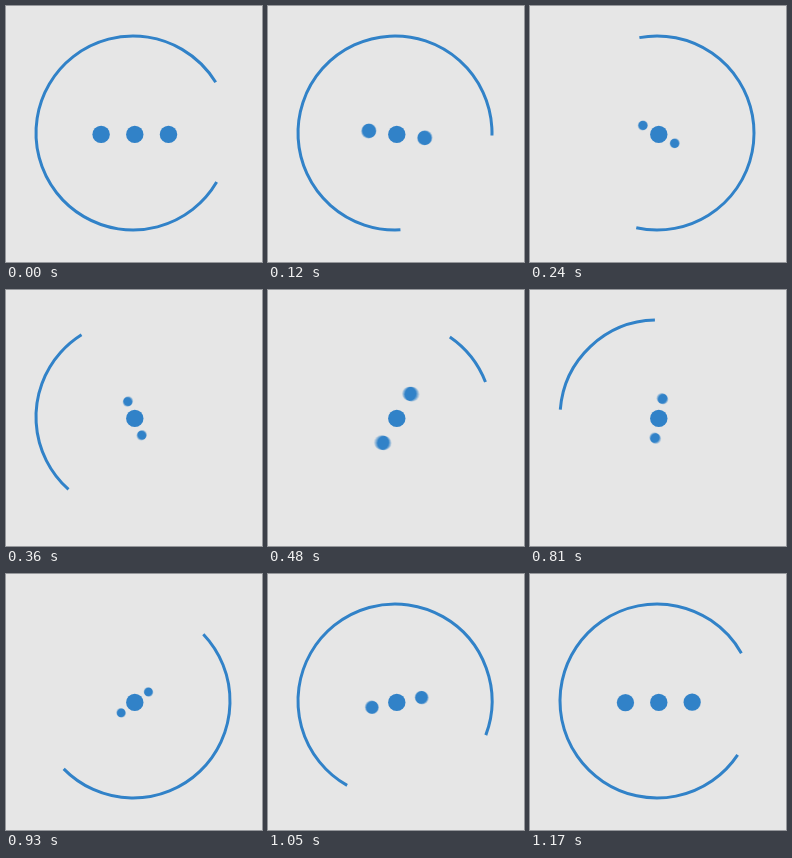
An HTML page with a canvas for the animation above (1.2 s loop, 256x256 px).

```html
<!DOCTYPE html>
<html lang="en">
<head>
<meta charset="utf-8">
<title>Loader</title>
<style>
  html, body { margin: 0; width: 100%; height: 100%; overflow: hidden; background: #e6e6e6; }
  canvas { display: block; width: 256px; height: 256px; }
</style>
</head>
<body>
<canvas id="stage" width="256" height="256"></canvas>
<script>
const SIZE = 256, LOOP = 1200, STEP = 30;
const BLUE = '#3182c8', PAPER = '#e6e6e6';
const RING = { x: 127, y: 127, r: 97, width: 3 };
const DOTS = { x: 128.8, y: 128.4, r: 8.7, gap: 33.7 };
const SHUTTER = 15, SAMPLES = 15;

const ctx = document.getElementById('stage').getContext('2d');
const mask = document.createElement('canvas');
mask.width = mask.height = SIZE;
const maskCtx = mask.getContext('2d');

const rad = deg => deg * Math.PI / 180;
const mix = (a, b, k) => a + (b - a) * k;
const wrap = (v, n) => ((v % n) + n) % n;

// cubic-bezier(.42, 0, .58, 1), solved by bisection
function easeInOut(x) {
  let lo = 0, hi = 1;
  for (let i = 0; i < 30; i++) {
    const s = (lo + hi) / 2, q = 1 - s;
    if (3 * q * q * s * 0.42 + 3 * q * s * s * 0.58 + s * s * s < x) lo = s;
    else hi = s;
  }
  return lo * lo * (3 - 2 * lo);
}

// Eased there-and-back value from 0 to 1 to 0
function swing(t, period) {
  const u = wrap(t, period) / period * 2;
  return easeInOut(u < 1 ? u : 2 - u);
}

function drawRing(t) {
  const k = swing(t, LOOP);
  ctx.strokeStyle = BLUE;
  ctx.lineWidth = RING.width;
  ctx.beginPath();
  ctx.arc(RING.x, RING.y, RING.r, rad(mix(30.4, 720.8, k)), rad(mix(328.5, 731.8, k)));
  ctx.stroke();
}

function dot(c, x, y, r) {
  c.beginPath();
  c.arc(x, y, r, 0, Math.PI * 2);
  c.fill();
}

// The orbiting pair is averaged over the shutter time for motion blur
function drawOrbit(t) {
  maskCtx.globalCompositeOperation = 'source-over';
  maskCtx.globalAlpha = 1;
  maskCtx.clearRect(0, 0, SIZE, SIZE);
  maskCtx.globalCompositeOperation = 'lighter';
  maskCtx.globalAlpha = 1 / SAMPLES;
  maskCtx.fillStyle = '#000';
  for (let i = 0; i < SAMPLES; i++) {
    const time = t + SHUTTER * ((i + 0.5) / SAMPLES - 0.5);
    const angle = rad(360 * easeInOut(wrap(time, LOOP) / LOOP));
    const scale = 1 - 0.5 * swing(time, LOOP / 2);
    const dx = Math.cos(angle) * DOTS.gap * scale;
    const dy = Math.sin(angle) * DOTS.gap * scale;
    dot(maskCtx, DOTS.x - dx, DOTS.y - dy, DOTS.r * scale);
    dot(maskCtx, DOTS.x + dx, DOTS.y + dy, DOTS.r * scale);
  }
  maskCtx.globalCompositeOperation = 'source-in';
  maskCtx.globalAlpha = 1;
  maskCtx.fillStyle = BLUE;
  maskCtx.fillRect(0, 0, SIZE, SIZE);
  ctx.drawImage(mask, 0, 0);
}

function draw(t) {
  ctx.fillStyle = PAPER;
  ctx.fillRect(0, 0, SIZE, SIZE);
  drawRing(t);
  drawOrbit(t);
  ctx.fillStyle = BLUE;
  dot(ctx, DOTS.x, DOTS.y, DOTS.r);
}

const start = performance.now();
function tick() {
  const elapsed = performance.now() - start;
  draw(Math.floor((elapsed + 1) / STEP) * STEP % LOOP);
  requestAnimationFrame(tick);
}
tick();
</script>
</body>
</html>
```
